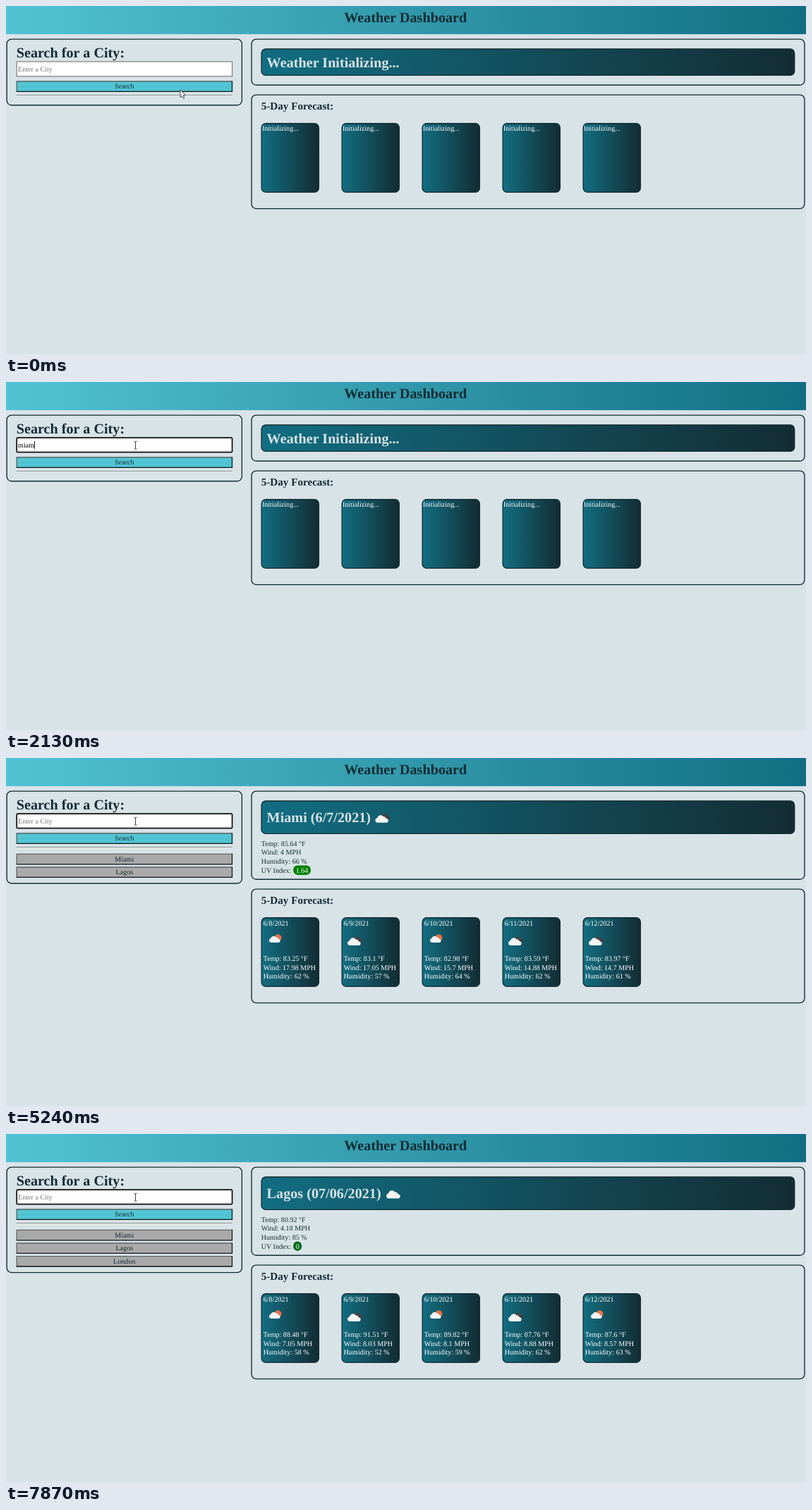
An HTML page that plays this animation: 1134 px wide and 494 px high, repeating every 8000 ms.

```html
<!DOCTYPE html>
<html lang="en">
<head>
<meta charset="utf-8">
<title>Weather Dashboard</title>
<style>
  html, body { margin: 0; width: 100%; height: 100%; overflow: hidden; background: #d8e3e7; }
  svg { display: block; }
  text { font: 10.1px "Liberation Serif", "Times New Roman", serif; fill: #132c33; text-rendering: geometricPrecision; white-space: pre; }
  .h1 { font-size: 20.2px; font-weight: bold; }
  .h2 { font-size: 15.15px; font-weight: bold; }
  .mid { text-anchor: middle; }
  .pale { fill: #d8e3e7; }
  .white { fill: #fff; }
  .hint { fill: #757575; }
  .typed { fill: #000; }
  .option { font: 8.15px "Open Sans", "Noto Sans", sans-serif; fill: #111; }
  .panel { fill: none; stroke: #132c33; stroke-width: 1.35; }
  .dark { fill: url(#deep); stroke: #132c33; stroke-width: 1.35; }
</style>
</head>
<body>
<svg width="1134" height="494" viewBox="0 0 1134 494">
  <defs>
    <linearGradient id="sky"><stop stop-color="#51c4d3"/><stop offset="1" stop-color="#126e82"/></linearGradient>
    <linearGradient id="deep"><stop stop-color="#126e82"/><stop offset="1" stop-color="#132c33"/></linearGradient>
    <filter id="shadow" x="-10%" y="-10%" width="120%" height="125%">
      <feDropShadow dx="0" dy="1" stdDeviation="1" flood-opacity=".35"/>
    </filter>
    <path id="cloud" d="M3.6 12A3.6 3.6 0 0 1 3.4 4.9A5 5 0 0 1 12.4 3.2A3.6 3.6 0 0 1 16.4 6A3 3 0 0 1 16.6 12Z"/>
  </defs>
  <rect width="1134" height="494" fill="#d8e3e7"/>
  <rect width="1134" height="40" fill="url(#sky)"/>
  <text class="h1 mid" x="566.3" y="23">Weather Dashboard</text>
  <g id="stage"></g>
</svg>
<script>
const LOOP = 8000;

// Each track is a list of [start time, value].
const typing = [
  [0, ''], [1540, 'm'], [1670, 'mi'], [1800, 'mia'], [2130, 'miam'], [2330, 'miami'], [2590, ''],
  [4110, 'l'], [4310, 'la'], [4440, 'lag'], [4570, 'lago'], [4700, 'lagos'], [4970, ''],
  [6520, 'l'], [6720, 'lo'], [6850, 'lon'], [7120, 'lond'], [7190, 'londo'], [7330, 'london'], [7600, '']
];
const caret = [
  [0, 0], [540, 1], [1210, 0], [1540, 1], [2850, 0], [3380, 1], [3840, 0],
  [4110, 1], [5240, 0], [5790, 1], [6320, 0], [6520, 1], [7870, 0]
];
const saved = [[0, 0], [2650, 1], [5040, 2], [7670, 3]];
const view = [[0, 'start'], [3120, 'miami'], [5440, 'loading'], [5790, 'lagos']];
const list = [[0, ''], [610, 'all'], [1670, ''], [4110, 'one'], [4380, ''], [6520, 'one'], [7400, '']];
const listAlpha = [[0, .5], [680, 1], [1600, .4], [4110, 1], [4310, .4], [6520, 1], [7330, .4]];
const glow = [[0, 0], [540, 1], [810, 0]];

const cities = ['Miami', 'Lagos', 'London'];
const history = ['jordan, mn', 'london', 'jordan', 'hello', 'chicago', 'the quilt'];
const miami = {
  title: 'Miami (6/7/2021)', icon: 'broken', iconX: 523,
  now: ['85.64', '4', '66'], uv: '1.64', uvWidth: 24.8, uvFill: '#008000',
  days: [['83.25', '17.98', 62, 'sun'], ['83.1', '17.05', 57, 'broken'], ['82.98', '15.7', 64, 'sun'],
         ['83.59', '14.88', 62, 'broken'], ['83.97', '14.7', 61, 'broken']]
};
const lagos = {
  title: 'Lagos (07/06/2021)', icon: 'cloud', iconX: 538.7,
  now: ['80.92', '4.18', '85'], uv: '0', uvWidth: 12, uvFill: '#066a18',
  days: [['88.48', '7.05', 58, 'sun'], ['91.51', '8.03', 52, 'broken'], ['89.82', '8.1', 59, 'sun'],
         ['87.76', '8.88', 62, 'broken'], ['87.6', '8.57', 63, 'sun']]
};

const stage = document.getElementById('stage');
const at = (track, t) => track.reduce((v, [start, value]) => t >= start ? value : v, track[0][1]);
const text = (x, y, s, cls = '') => `<text class="${cls}" x="${x}" y="${y}">${s}</text>`;
const rect = (x, y, w, h, r, attrs) => `<rect x="${x}" y="${y}" width="${w}" height="${h}" rx="${r}" ${attrs}/>`;
const panel = (x, y, w, h) => rect(x, y, w, h, 6.5, 'class="panel"');
const dark = (x, y, w, h) => rect(x, y, w, h, 6, 'class="dark"');
const readings = ([temp, wind, humidity]) =>
  [`Temp: ${temp} °F`, `Wind: ${wind} MPH`, `Humidity: ${humidity} %`];

function button(y, label, fill) {
  return rect(14.7, y, 306.4, 15.6, 0, `fill="${fill}"`) +
    `<path d="M15.3 ${y + 15}V${y + .6}H320.5" fill="none" stroke="#5f6668" stroke-width="1.26"/>` +
    `<path d="M14.7 ${y + 15}H320.5V${y}" fill="none" stroke="#10181a" stroke-width="1.26"/>` +
    text(167.8, y + 10.9, label, 'mid');
}

function icon(kind, x, y) {
  const cloud = (dx, dy, s, fill) =>
    `<use href="#cloud" transform="translate(${x + dx} ${y + dy}) scale(${s})" fill="${fill}"/>`;
  if (kind === 'sun')
    return `<circle cx="${x + 13}" cy="${y + 4.2}" r="4.9" fill="#e57247"/>` + cloud(0, 1, .83, '#f4f4f4');
  if (kind === 'broken')
    return cloud(7, -.4, .72, '#4a3c40') + cloud(0, 1, .97, '#f4f4f4');
  return cloud(0, 0, 1.03, '#f4f4f4');
}

function searchPanel(t) {
  const value = at(typing, t), count = at(saved, t), focused = t >= 540;
  let out = panel(1.2, 47.1, 333.2, 93.7 + 18.6 * count) + text(14.7, 73, 'Search for a City:', 'h1');
  out += focused
    ? rect(15.2, 79.2, 305.4, 20.4, 1.2, 'fill="#fff" stroke="#101010" stroke-width="1.7"')
    : rect(15.2, 79, 305.4, 20.8, 0, 'fill="#fff" stroke="#767676" stroke-width="1.1"');
  out += value ? text(17.1, 92.7, value, 'typed') : text(17.1, 92.7, 'Enter a City', 'hint');
  out += button(106.4, 'Search', '#51c4d3');
  out += rect(14.7, 126, 306.2, 1, 0, 'fill="#8f9496"') + rect(14.7, 127, 306.2, .5, 0, 'fill="#eef1f2"');
  cities.slice(0, count).forEach((c, i) => out += button(135.8 + 18.6 * i, c, '#a9a9a9'));
  return out;
}

function weatherPanels(t) {
  const mode = at(view, t), idle = mode === 'start', loaded = mode === 'miami' || mode === 'lagos';
  const data = mode === 'miami' ? miami : lagos;
  const barH = loaded ? 46.4 : 37.4, lift = loaded ? 0 : -9;
  const shift = idle ? 0 : 60 + lift;

  let out = panel(348.1, 47.1, 783.8, 65.2 + shift) + dark(362.1, 61, 755.6, barH) +
    text(369.6, loaded ? 91.4 : 87, idle ? 'Weather Initializing...' : data.title, 'h1 pale');
  if (!idle) {
    if (loaded) out += icon(data.icon, data.iconX, 79.2);
    readings(data.now).forEach((line, i) => out += text(361.7, 124.6 + 12.7 * i + lift, line));
    out += text(361.7, 162.7 + lift, 'UV Index:') +
      rect(407.2, 152.5 + lift, data.uvWidth, 13.4, 6.2, `fill="${data.uvFill}"`) +
      text(410.7, 162.7 + lift, data.uv, 'white');
  }

  out += panel(348.1, 126.1 + shift, 783.8, 161.5) + text(361.7, 146.8 + shift, '5-Day Forecast:', 'h2');
  data.days.forEach((day, i) => {
    const x = 361.5 + 114 * i, y = 166 + shift;
    out += dark(x + .7, y + .7, 81.2, 97.6);
    if (idle) {
      out += text(x + 1.4, y + 11, 'Initializing...', 'white');
      return;
    }
    out += text(x + 3.2, y + 11.8, `6/${8 + i}/2021`, 'white');
    out += day[3] === 'sun' ? icon('sun', x + 11, y + 25) : icon('broken', x + 8.2, y + 27.4);
    readings(day).forEach((line, k) => out += text(x + 3.2, y + 61.7 + 12.8 * k, line, 'white'));
  });
  return out;
}

function dropdown(t) {
  const kind = at(list, t);
  if (!kind) return '';
  const rows = kind === 'all' ? history : ['london'];
  return `<g opacity="${at(listAlpha, t)}">` +
    rect(14.6, 100.4, 122.3, 10.4 + 23 * rows.length, 1.5, 'fill="#fff" filter="url(#shadow)"') +
    rows.map((row, i) => text(22.2, 120.5 + 23 * i, row, 'option')).join('') + '</g>';
}

function caretMark(t) {
  if (!at(caret, t)) return '';
  const typed = stage.querySelector('.typed');
  const x = 17.1 + (typed ? typed.getComputedTextLength() : 0);
  return rect(x, 84, .9, 11, 0, 'fill="#000"');
}

function pointer(t) {
  // The mouse is sampled every 70 ms on its way to the field.
  const p = Math.min(1, Math.max(0, Math.floor(t / 70) / 7));
  const e = p * p * (3 - 2 * p), x = 247 - 63.5 * e, y = 119 - 29.2 * e;
  const halo = at(glow, t) ? `<circle cx="${x - 1.5}" cy="${y - 1.3}" r="8" fill="#ffff3c" opacity=".8"/>` : '';
  const iBeam = `<path d="M-2-5.3H-.5L0-4.8L.5-5.3H2M0-4.8V4.8M-2 5.3H-.5L0 4.8L.5 5.3H2" fill="none" stroke="#222" stroke-width=".9"/>`;
  const arrow = `<path d="M0 0V10.6L2.5 8.3L4.2 12L5.9 11.2L4.2 7.7H7.6Z" fill="#fff" stroke="#222" stroke-width=".8"/>`;
  return halo + `<g transform="translate(${x} ${y})">${y < 100 ? iBeam : arrow}</g>`;
}

let last = '';
function render(t) {
  const base = searchPanel(t) + weatherPanels(t) + dropdown(t) + pointer(t);
  const key = base + at(caret, t);
  if (key !== last) {
    last = key;
    stage.innerHTML = base;
    stage.insertAdjacentHTML('beforeend', caretMark(t));
  }
}

function frame() {
  render(performance.now() % LOOP);
  requestAnimationFrame(frame);
}
frame();
</script>
</body>
</html>
```
